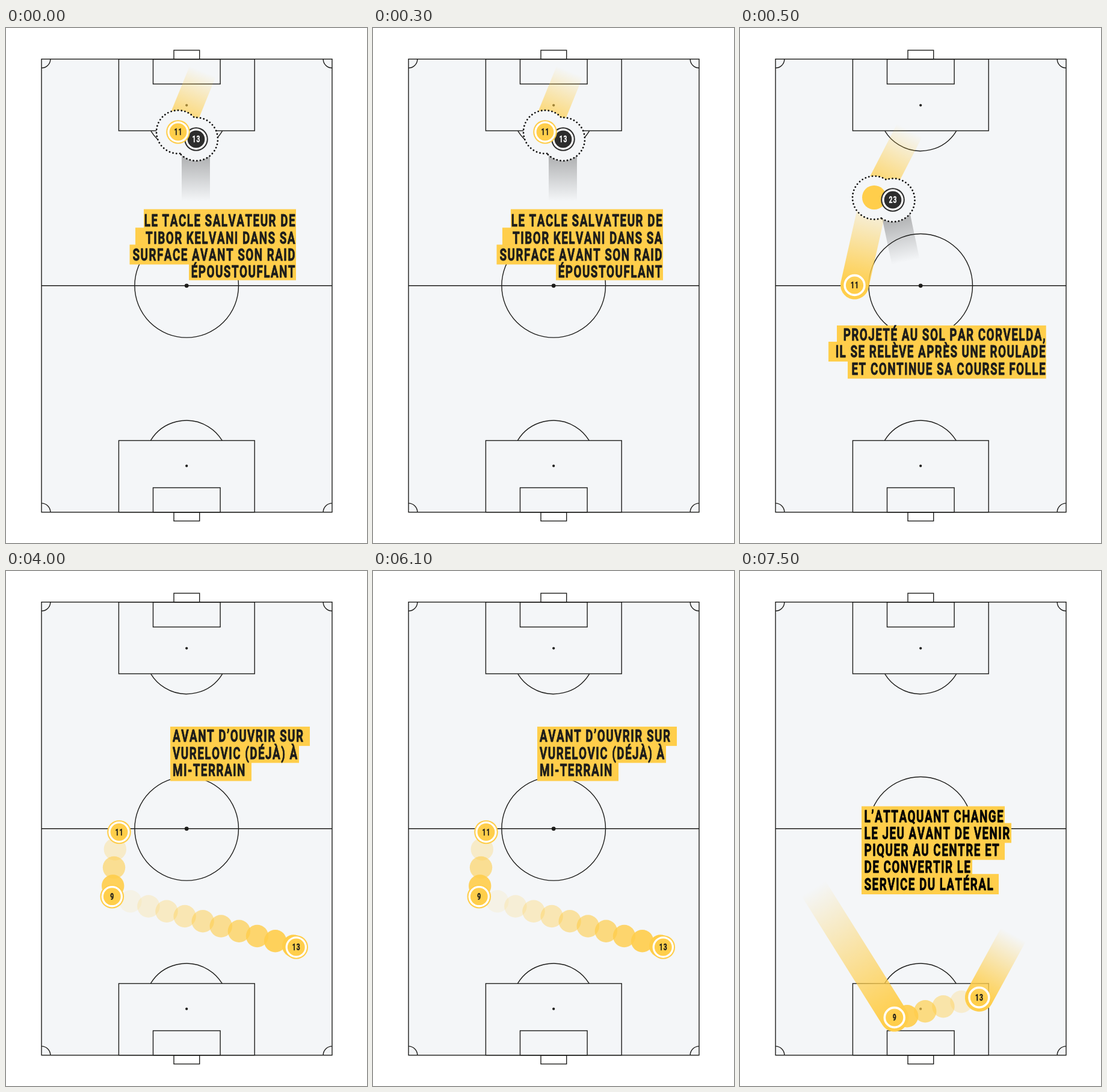
These frames come from a looping animation (600x857 px, 8000 ms). An HTML page with a canvas:

```html
<!DOCTYPE html>
<html lang="fr">
<head>
<meta charset="utf-8">
<title>Pitch sequence</title>
<style>
  html, body { margin: 0; width: 100%; height: 100%; overflow: hidden; background: #fff; }
  canvas { display: block; width: 600px; height: 857px; }
</style>
</head>
<body>
<canvas id="stage" width="600" height="857"></canvas>
<script>
const ctx = document.getElementById('stage').getContext('2d');
const TAU = Math.PI * 2;
const INK = '#1d1d1b', DARK = '#2d2d2d', GRASS = '#f4f6f8', WHITE = '#fff';
const YELLOW = '#ffce4b', YELLOW_RGB = '255,206,75', GREY_RGB = '45,45,45';
const TRAIL_WIDTH = 47, GHOST_RADIUS = 18.7;
const LINE_STEP = 28.25, ROW_HALF = 16.5;
const CONDENSE = 0.685;

function disc(x, y, r, color) {
  ctx.fillStyle = color;
  ctx.beginPath();
  ctx.arc(x, y, r, 0, TAU);
  ctx.fill();
}

function ring(x, y, r, width, color) {
  ctx.strokeStyle = color;
  ctx.lineWidth = width;
  ctx.beginPath();
  ctx.arc(x, y, r, 0, TAU);
  ctx.stroke();
}

function arcLine(x, y, r, from, to) {
  ctx.beginPath();
  ctx.arc(x, y, r, from, to);
  ctx.stroke();
}

// Condensed lettering, one squeeze for every label
function label(str, x, y, size, color, align, spacing) {
  ctx.save();
  ctx.translate(x, y);
  ctx.scale(CONDENSE, 1);
  ctx.font = `bold ${size}px Roboto, Arial, sans-serif`;
  ctx.fontKerning = 'none';
  ctx.letterSpacing = spacing + 'px';
  ctx.textAlign = align;
  ctx.fillStyle = ctx.strokeStyle = color;
  ctx.lineWidth = size * 0.03;
  ctx.lineJoin = 'round';
  ctx.fillText(str, 0, 0);
  ctx.strokeText(str, 0, 0);
  ctx.restore();
}

function drawPitch() {
  ctx.fillStyle = WHITE;
  ctx.fillRect(0, 0, 600, 857);
  ctx.fillStyle = GRASS;
  ctx.fillRect(59, 51.7, 483, 754);
  ctx.strokeStyle = INK;
  ctx.lineWidth = 1.4;
  ctx.strokeRect(59, 51.7, 483, 754);

  ctx.strokeRect(279, 37, 42.7, 14.7);
  ctx.strokeRect(187.4, 51.7, 225.8, 119.3);
  ctx.strokeRect(244.5, 51.7, 111.6, 41.5);
  ctx.strokeRect(279, 805.7, 42.7, 14.7);
  ctx.strokeRect(187.4, 686.5, 225.8, 119.2);
  ctx.strokeRect(244.5, 765, 111.6, 40.7);

  ctx.beginPath();
  ctx.moveTo(59, 428.8);
  ctx.lineTo(542, 428.8);
  ctx.stroke();
  arcLine(300.2, 428.8, 86.3, 0, TAU);

  const half = Math.asin(59.4 / 69.6);
  arcLine(300.2, 135, 69.6, Math.PI / 2 - half, Math.PI / 2 + half);
  arcLine(299.8, 722.7, 69.6, -Math.PI / 2 - half, -Math.PI / 2 + half);

  [[59, 51.7], [542, 51.7], [542, 805.7], [59, 805.7]].forEach(([x, y], i) =>
    arcLine(x, y, 14.8, i * TAU / 4, (i + 1) * TAU / 4));

  disc(300.2, 428.8, 3.4, INK);
  disc(300.2, 128.6, 2.1, INK);
  disc(300.2, 728.7, 2.1, INK);
}

// Band fading from its head towards its tail
function trail(x, y, tailX, tailY, rgb, strength = 1, roundHead = false) {
  const length = Math.hypot(tailX - x, tailY - y);
  const r = TRAIL_WIDTH / 2;
  ctx.save();
  ctx.translate(x, y);
  ctx.rotate(Math.atan2(tailY - y, tailX - x));
  const fade = ctx.createLinearGradient(0, 0, length, 0);
  fade.addColorStop(0, `rgba(${rgb},${strength})`);
  fade.addColorStop(1, `rgba(${rgb},0)`);
  ctx.fillStyle = fade;
  ctx.beginPath();
  ctx.moveTo(length, -r);
  ctx.lineTo(0, -r);
  if (roundHead) ctx.arc(0, 0, r, -Math.PI / 2, Math.PI / 2, true);
  ctx.lineTo(0, r);
  ctx.lineTo(length, r);
  ctx.fill();
  ctx.restore();
}

// Dotted outline around two players in a duel
function duel(x1, y1, x2, y2) {
  const r = 36;
  const axis = Math.atan2(y2 - y1, x2 - x1);
  const open = Math.acos(Math.hypot(x2 - x1, y2 - y1) / 2 / r);
  ctx.beginPath();
  ctx.arc(x1, y1, r, axis + open, axis - open + TAU);
  ctx.arc(x2, y2, r, axis + Math.PI + open, axis + Math.PI - open + TAU);
  ctx.closePath();
  ctx.fillStyle = GRASS;
  ctx.fill();
  ctx.save();
  ctx.strokeStyle = '#111';
  ctx.lineWidth = 2.9;
  ctx.lineCap = 'round';
  ctx.setLineDash([0, 5.8]);
  ctx.stroke();
  ctx.restore();
}

function number(n, x, y, color) {
  label(String(n), x + 0.5, y + 5.4, 15.2, color, 'center', 1.5);
}

function player(n, x, y, color = YELLOW) {
  disc(x, y, 19.8, color);
  disc(x, y, 17.7, WHITE);
  disc(x, y, 14.4, color);
  number(n, x, y, color === YELLOW ? INK : WHITE);
}

function runner(n, x, y, tailX, tailY) {
  trail(x, y, tailX, tailY, YELLOW_RGB, 1, true);
  ring(x, y, 16.4, 3.6, WHITE);
  number(n, x, y, INK);
}

// Row of discs along a pass, growing stronger towards the receiver
function ghosts(x, y, dx, dy, count, from, to) {
  for (let i = 0; i < count; i++) {
    const alpha = from + (to - from) * i / (count - 1);
    disc(x + dx * i, y + dy * i, GHOST_RADIUS, `rgba(${YELLOW_RGB},${alpha})`);
  }
}

// rows: [text, x of the free edge]; edge: x of the shared edge
function caption({ rows, edge, textX, top, bottom, middle, align, color = INK }) {
  const last = rows.length - 1;
  ctx.fillStyle = YELLOW;
  rows.forEach(([, free], i) => {
    const mid = middle + i * LINE_STEP;
    const y1 = i === 0 ? top : mid - ROW_HALF;
    const y2 = i === last ? bottom : mid + ROW_HALF;
    ctx.fillRect(Math.min(edge, free), y1, Math.abs(edge - free), y2 - y1);
  });
  rows.forEach(([str], i) =>
    label(str, textX, middle + i * LINE_STEP + 9.8, 27.6, color, align, 2.1));
}

function tackle() {
  trail(286, 173, 327, 72, YELLOW_RGB);
  trail(315.5, 185, 315.5, 288, GREY_RGB, 0.48);
  duel(286, 173, 316, 185);
  player(13, 316, 185, DARK);
  player(11, 286, 173);
  caption({
    rows: [['LE TACLE SALVATEUR DE', 229], ['TIBOR KELVANI DANS SA', 215],
      ['SURFACE AVANT SON RAID', 205.5], ['ÉPOUSTOUFLANT', 304]],
    edge: 482, textX: 482, top: 301.5, bottom: 419.7, middle: 320.5, align: 'right'
  });
}

function roll() {
  trail(224, 283, 282, 170, YELLOW_RGB);
  trail(254, 287, 275.5, 389, GREY_RGB, 0.48);
  runner(11, 190.5, 428, 223, 283);
  duel(223, 282.5, 254.5, 286.5);
  disc(223, 282, 20, YELLOW);
  player(23, 254, 286, DARK);
  caption({
    rows: [['PROJETÉ AU SOL PAR CORVELDA,', 161], ['IL SE RELÈVE APRÈS UNE ROULADE', 147],
      ['ET CONTINUE SA COURSE FOLLE', 179]],
    edge: 508.7, textX: 509, top: 495, bottom: 583.5, middle: 510.3, align: 'right'
  });
}

function opening() {
  ghosts(181.3, 463, -1.8, 30.5, 3, 0.28, 0.9);
  ghosts(206.8, 549.8, 30.1, 8.25, 10, 0.1, 1);
  player(11, 188, 434.5);
  player(9, 176.3, 541.7);
  player(13, 482.3, 626);
  caption({
    rows: [['AVANT D’OUVRIR SUR', 505], ['VURELOVIC (DÉJÀ) À', 487], ['MI-TERRAIN', 408]],
    edge: 273, textX: 277, top: 259, bottom: 349.5, middle: 274.6, align: 'left'
  });
}

function finish() {
  ghosts(368, 716.7, -30.1, 8, 4, 0.24, 0.9);
  runner(9, 256.7, 743, 122, 528);
  runner(13, 397.4, 709.7, 454.5, 605);
  caption({
    rows: [['L’ATTAQUANT CHANGE', 440], ['LE JEU AVANT DE VENIR', 451],
      ['PIQUER AU CENTRE ET', 440], ['DE CONVERTIR LE', 386], ['SERVICE DU LATÉRAL', 430]],
    edge: 202, textX: 206.5, top: 391.5, bottom: 538, middle: 407.7, align: 'left', color: '#050505'
  });
}

const LOOP = 8000;
const scenes = [[500, tackle], [4000, roll], [7500, opening], [LOOP, finish]];
const start = performance.now();

function frame() {
  const t = (performance.now() - start) % LOOP;
  drawPitch();
  scenes.find(([end]) => t < end)[1]();
  requestAnimationFrame(frame);
}
frame();
</script>
</body>
</html>
```
